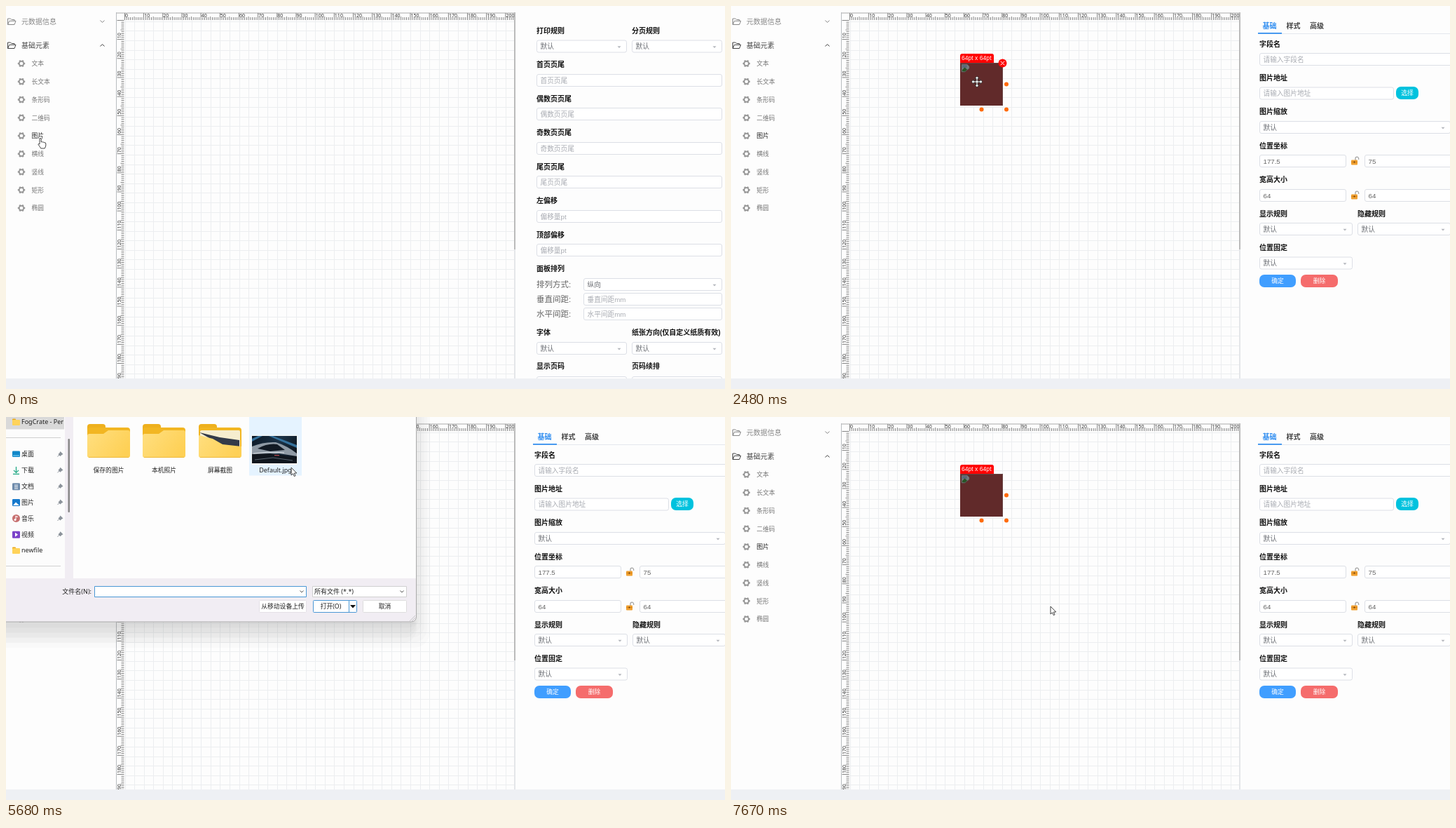
Animation of 1026x546 px, one loop 8000 ms. Source, as an HTML page with a canvas:

```html
<!DOCTYPE html>
<html lang="zh">
<head>
<meta charset="utf-8">
<style>
html, body { margin: 0; width: 100%; height: 100%; overflow: hidden; background: #fdfdfd; }
canvas { display: block; }
</style>
</head>
<body>
<canvas id="stage" width="1026" height="546"></canvas>
<script>
const ctx = document.getElementById('stage').getContext('2d');
const LOOP = 8000;
const UI = '"Liberation Sans", "Noto Sans CJK SC", "Noto Sans CJK", sans-serif';
const SYSTEM = '"Noto Sans", "Noto Sans CJK SC", "Noto Sans CJK", sans-serif';

// time, x, y, shape of the pointer; it jumps from one place to the next
const POINTER = [
  [0, 49, 188, 'hand'], [220, 52, 188, 'hand'], [500, 190, 150, 'move'], [780, 325, 112, 'move'],
  [1080, 394.5, 95.5, 'move'], [1640, 386, 98, 'move'], [1920, 366, 104, 'move'], [2200, 351, 108, 'move'],
  [3320, 420, 112, 'arrow'], [3600, 640, 120, 'arrow'], [3880, 860, 125, 'arrow'], [4160, 964, 125, 'hand'],
  [4740, 964, 125, 'arrow'], [5100, 890, 118, 'arrow'], [5400, 610, 95, 'arrow'], [5680, 407, 72, 'arrow'],
  [6240, 416, 130, 'arrow'], [6520, 438, 222, 'arrow'], [6800, 451, 264, 'arrow'], [7100, 455, 269, 'arrow'],
  [7380, 456, 270, 'arrow']
];
const DRAG = 500, DROP = 1360, SELECT = 2480, LEAVE = 3320, OPEN = 5100, HOVER = 5680, PICK = 5960, CLOSE = 7380;

function rect(x, y, w, h, color) {
  ctx.fillStyle = color;
  ctx.fillRect(x, y, w, h);
}

function box(x, y, w, h, radius, fill, stroke, width = 1) {
  ctx.beginPath();
  ctx.roundRect(x, y, w, h, radius);
  if (fill) { ctx.fillStyle = fill; ctx.fill(); }
  if (stroke) { ctx.strokeStyle = stroke; ctx.lineWidth = width; ctx.stroke(); }
}

function dot(x, y, r, fill) {
  ctx.beginPath();
  ctx.arc(x, y, r, 0, 7);
  ctx.fillStyle = fill;
  ctx.fill();
}

function line(points, color, width = 1) {
  ctx.beginPath();
  for (let i = 0; i < points.length; i += 2) ctx.lineTo(points[i], points[i + 1]);
  ctx.strokeStyle = color;
  ctx.lineWidth = width;
  ctx.stroke();
}

function shape(path, x, y, fill, stroke, width = 1) {
  ctx.save();
  ctx.translate(x, y);
  const p = new Path2D(path);
  if (fill) { ctx.fillStyle = fill; ctx.fill(p); }
  if (stroke) { ctx.strokeStyle = stroke; ctx.lineWidth = width; ctx.stroke(p); }
  ctx.restore();
}

function gradient(x0, y0, x1, y1, ...colors) {
  const g = ctx.createLinearGradient(x0, y0, x1, y1);
  colors.forEach((c, i) => g.addColorStop(i / (colors.length - 1), c));
  return g;
}

// y is the middle of the glyphs
function text(str, x, y, size, color, { weight = 400, align = 'left', font = UI } = {}) {
  ctx.font = `${weight} ${size}px ${font}`;
  ctx.textAlign = align;
  ctx.fillStyle = color;
  ctx.fillText(str, x, y + size * 0.37);
}

const label = (str, x, y) => text(str, x, y, 10, '#111', { weight: 700 });

function field(x, y, w, str, color = '#a8abb2') {
  box(x + .5, y - 8.5, w - 1, 17, 2.5, '#fff', '#dcdfe6');
  text(str, x + 5.5, y, 9.7, color);
}

function select(x, y, w, str = '默认') {
  field(x, y, w, str, '#6b6e74');
  shape('M-2.5 -1H2.5L0 1.7Z', x + w - 11, y + .7, '#b4b7bd');
}

function button(x, y, w, str, color) {
  box(x, y - 9, w, 18, 7, color);
  text(str, x + w / 2, y, 8.8, '#fff', { align: 'center' });
}

function sidebar() {
  const group = (str, y, color, flip) => {
    shape('M0 4.5V-4H4L5.5 -2.5H9.5V-.7M0 4.5L2.3 -.7H11.5L9.5 4.5Z', 2.5, y, null, color);
    text(str, 22, y, 10, color);
    line([134.5, y - 1.5 * flip, 137.5, y + 1.5 * flip, 140.5, y - 1.5 * flip], color);
  };
  group('元数据信息', 22, '#888', 1);
  group('基础元素', 56, '#444', -1);
  ['文本', '长文本', '条形码', '二维码', '图片', '横线', '竖线', '矩形', '椭圆'].forEach((name, i) => {
    const y = 82 + 25.75 * i;
    ctx.beginPath();
    ctx.arc(22, y, 3.3, 0, 7);
    ctx.strokeStyle = '#999';
    ctx.lineWidth = 1.9;
    ctx.stroke();
    for (let a = 0; a < 6; a++) {
      const c = Math.cos(a * Math.PI / 3), s = Math.sin(a * Math.PI / 3);
      line([22 + 3.5 * c, y + 3.5 * s, 22 + 5.2 * c, y + 5.2 * s], '#999', 2.4);
    }
    text(name, 36.5, y, 8.8, i === 4 ? '#222' : '#777');
  });
}

function paper() {
  const mm = 2.717;
  ctx.save();
  ctx.beginPath();
  ctx.rect(157, 9, 569, 522);
  ctx.clip();
  rect(157, 9, 569, 522, '#fdfdfd');
  for (let i = 0; i < 41; i++) {
    rect(Math.round(169.5 + i * 5 * mm), 20, 1, 511, '#eceef0');
    rect(169, Math.round(21.8 + i * 5 * mm), 557, 1, '#eceef0');
  }
  rect(157, 9.5, 569, 1, '#aaa');
  rect(157, 9, 1, 522, '#b8bcc0');
  for (let i = 0; i <= 205; i++) {
    const long = i % 10 === 0, size = long ? 10 : i % 5 ? 4 : 5;
    const x = 169 + i * mm, y = 20 + i * mm;
    rect(x, 20 - size, .9, size, '#777');
    rect(168.5 - size, y, size, .9, '#777');
    if (!long) continue;
    text(String(i), x + 1, 13, 7, '#333', { font: SYSTEM });
    if (!i) continue;
    ctx.save();
    ctx.translate(161, y - 1);
    ctx.rotate(-Math.PI / 2);
    text(String(i), 0, 0, 7, '#333', { font: SYSTEM });
    ctx.restore();
  }
  ctx.restore();
  rect(725, 9, 2, 522, '#e4e6e9');
  rect(725, 9, 2, 338, '#bbb');
}

function pagePanel() {
  label('打印规则', 757, 35);
  select(757, 57.5, 129);
  label('分页规则', 893, 35);
  select(893, 57.5, 129);
  ['首页页尾', '偶数页页尾', '奇数页页尾', '尾页页尾', '左偏移', '顶部偏移'].forEach((name, i) => {
    const y = 83.5 + 48.5 * i;
    label(name, 757, y);
    field(757, Math.round(y + 22), 265, i < 4 ? name : '偏移量pt');
  });
  label('面板排列', 757, 374);
  ['排列方式:', '垂直间距:', '水平间距:'].forEach((name, i) => text(name, 757, 396.5 + 21.3 * i, 11.5, '#666'));
  select(824, 397, 198, '纵向');
  field(824, 418, 198, '垂直间距mm');
  field(824, 439, 198, '水平间距mm');
  label('字体', 757, 465);
  select(757, 488, 129);
  label('纸张方向(仅自定义纸质有效)', 893, 465);
  select(893, 488, 129);
  label('显示页码', 757, 513.5);
  label('页码续排', 893, 513.5);
  select(757, 537, 129, '');
  select(893, 537, 129, '');
}

function padlock(y) {
  shape('M1 -1V-3.5A2.3 2.3 0 0 1 5.6 -3.5V-2', 890, y, null, '#a5a5a5', 1.3);
  box(885, y - 1.5, 9, 7, 1, '#f0a030');
  rect(885, y + 1, 9, 1, '#d98318');
  dot(889.5, y + 1.5, 1.1, '#663808');
}

function elementPanel() {
  rect(752, 39, 274, 1, '#e4e7ed');
  rect(752, 38, 34, 1.7, '#2d8cf0');
  text('基础', 758.5, 28, 10, '#2d8cf0', { weight: 700 });
  text('样式', 792.5, 28, 10, '#444', { weight: 700 });
  text('高级', 826, 28, 10, '#444', { weight: 700 });
  label('字段名', 754, 54);
  field(754, 76, 280, '请输入字段名');
  label('图片地址', 754, 102);
  field(754, 124.5, 192, '请输入图片地址');
  button(949, 124, 32, '选择', '#00c2de');
  label('图片缩放', 754, 150.5);
  select(754, 173, 273);
  [['位置坐标', 199, '177.5', '75'], ['宽高大小', 247.5, '64', '64']].forEach(([name, y, a, b]) => {
    const row = Math.round(y + 22);
    label(name, 754, y);
    field(754, row, 124, a, '#666');
    padlock(row);
    field(904, row, 130, b, '#666');
  });
  label('显示规则', 754, 296);
  select(754, 318, 133);
  label('隐藏规则', 894, 296);
  select(894, 318, 133);
  label('位置固定', 754, 344.5);
  select(754, 366.5, 133);
  button(754, 392, 52, '确定', '#409eff');
  button(813, 392, 53, '删除', '#f56c6c');
}

function brokenImage(x, y) {
  shape('M0 0H8L11 3V6L7 9L5 11H0Z', x, y, '#f3f6fa', '#aaa', .7);
  rect(x + 1.2, y + 1.2, 6.5, 4, '#b6cff2');
  shape('M1 10V8L4.5 4.5L8 7.5L5 10.5Z', x, y, '#4fa94a');
}

function pictureElement(t, px, py) {
  const held = t < DROP;
  const x = held ? px - 66.5 : 327, y = held ? py - 12.5 : 81;
  rect(x, y, 61, 61, '#c45454');
  line([x, y + .5, x + 60.5, y + .5, x + 60.5, y + 60.5], '#d4a0a0', .7);
  brokenImage(x + 2, y + 2);
  if (t < SELECT) return;
  rect(x, y, 61, 61, 'rgba(0,0,0,.5)');
  box(327, 68, 48, 13, [3, 3, 0, 0], '#f00');
  text('64pt x 64pt', 329, 73.5, 8.6, '#fff');
  [[393, 111.5], [357.5, 147.5], [393, 147.5]].forEach(([hx, hy]) => dot(hx, hy, 3, '#ff6a0c'));
  if (t >= LEAVE) return;
  dot(387.5, 81.5, 6, '#f00');
  line([384.7, 78.7, 390.3, 84.3], '#fff');
  line([390.3, 78.7, 384.7, 84.3], '#fff');
}

function folder(x, name, preview) {
  box(x, 10, 26, 20, 4, '#eeb01e');
  box(x, 15, 61, 42, 4, '#f2b622');
  if (preview) {
    box(x + 2, 19, 57, 26, 2, '#f6edcf');
    shape('M1 13L30 20L58 24V35L36 34L22 25Z', x, 9, '#343b49');
  }
  const front = preview
    ? 'M0 16L20 21L34 29L61 32V45Q61 48 58 48H3Q0 48 0 45Z'
    : 'M0 17Q0 14 3 14H23L30 9H58Q61 9 61 12V45Q61 48 58 48H3Q0 48 0 45Z';
  shape(front, x, 10, gradient(0, 10, 50, 48, '#ffdf80', '#fed055'));
  rect(x + 2, 57, 57, 1, '#eeb93a');
  text(name, x + 30.5, 75.5, 8.8, '#222', { align: 'center', font: SYSTEM });
}

function thumbnail(x, y) {
  rect(x - 1, y - 1, 66, 42, '#f4f4f4');
  rect(x, y, 64, 39, gradient(x, y, x + 64, y + 39, '#0d1825', '#1b3247', '#080c12'));
  shape('M30 0L64 13V17L24 0ZM0 8L15 0H9L0 4Z', x, y, '#35719c');
  shape('M0 15Q17 8 34 9Q50 14 64 25V29L39 25L14 27L0 26Z', x, y, '#8f9aa5');
  shape('M8 18Q23 10 36 12L47 20L26 22Z', x, y, '#121a24');
  shape('M0 26L26 25L42 27L64 33V39H0Z', x, y, '#10161e');
  line([x + 2, y + 25, x + 25, y + 23, x + 46, y + 24], '#dfe5ea', 1.2);
  line([x + 4, y + 34, x + 30, y + 31, x + 58, y + 35], '#59646f', 1);
  rect(x + 32, y + 27, 7, 1.3, '#b0474c');
}

function navIcon(kind, y) {
  if (kind === 1) {
    line([14.5, y - 5, 14.5, y + 3], '#20a884', 1.3);
    line([11, y, 14.5, y + 3.5, 18, y], '#20a884', 1.3);
    line([10, y + 5.5, 19, y + 5.5], '#20a884', 1.3);
  } else if (kind === 4) {
    dot(14.5, y, 5.5, '#c77070');
    line([14, y + 2, 14, y - 3, 17, y - 2], '#fff', 1.1);
    dot(13, y + 2, 1.5, '#fff');
  } else if (kind === 6) {
    box(9, y - 4.5, 5, 4, 1, '#e9a818');
    box(9, y - 3, 11, 8, 1, '#ffd35a');
  } else {
    box(9, y - 4.5, 11, kind === 0 ? 8.5 : 10, 1.3, ['#1287c8', 0, '#6e8bab', '#1679cc', 0, '#7b42c9'][kind]);
    if (kind === 0) rect(10, y + 1.5, 9, 1, '#8fe0ff');
    if (kind === 2) for (let i = 0; i < 3; i++) rect(12, y - 2 + i * 2.4, 5, 1, '#fff');
    if (kind === 3) shape('M10 4.5L14 0L19 4.5Z', 0, y, '#fff');
    if (kind === 5) shape('M13 -2.5L17 .5L13 3.5Z', 0, y, '#fff');
  }
}

function dialogShadow() {
  for (let i = 1; i <= 5; i++) box(-30, -30, 615 + 4 * i, 322 + 7.4 * i, 8 + 3 * i, 'rgba(50,45,55,.02)');
  // denser below the window than beside it
  for (let i = 1; i <= 4; i++) box(-30, -30, 612 + i, 324 + 7 * i, 8 + 3 * i, 'rgba(50,45,55,.02)');
}

function dialog(t) {
  const opt = { font: SYSTEM };
  const picked = t >= PICK;
  dialogShadow();
  box(-10, -10, 595.5, 302, 7, '#f1edf3', '#aaa');
  rect(0, 0, 84, 230, '#fcfcfc');
  rect(96, 0, 489, 230, '#fdfdfd');
  rect(0, 0, 83, 17.5, '#d9d9d9');
  navIcon(6, 7);
  ctx.save();
  ctx.beginPath();
  ctx.rect(0, 0, 83, 18);
  ctx.clip();
  text('FogCrate - Per', 22, 7, 9, '#222', opt);
  ctx.restore();
  rect(0, 29, 78, 1, '#d0d0d0');
  rect(0, 212, 78, 1, '#d0d0d0');
  box(88.5, 31, 2.5, 105, 1.2, '#888');
  ['桌面', '下载', '文档', '图片', '音乐', '视频', 'newfile'].forEach((name, i) => {
    const y = 53 + 22.85 * i;
    navIcon(i, y);
    text(name, 22, y, 9, '#222', opt);
    if (i < 6) {
      shape('M0 -4L4 0L2 1L0 3L-3 0L-1 -2Z', 77.5, y, '#8b929a');
      line([76, y + 1, 73.5, y + 3.5], '#8b929a');
    }
  });
  folder(116, '保存的图片');
  folder(195, '本机照片');
  folder(275, '屏幕截图', true);
  if (picked) box(346.5, -5, 75, 88, 0, '#cce8ff', '#3d5366');
  else if (t >= HOVER) rect(347, 0, 75, 83.5, '#e5f3ff');
  thumbnail(351, 27);
  text('Default.jpg', 384.5, 75.5, 9, '#222', { align: 'center', font: SYSTEM });

  text('文件名(N):', 122, 249, 9, '#222', { align: 'right', font: SYSTEM });
  box(126.5, 241.5, 302, 15, 0, '#fff', picked ? '#aaa' : '#4b98d5');
  if (picked) text('Default.jpg', 128, 249, 9, '#222', opt);
  box(437.5, 241.5, 134, 15, 0, '#fff', '#d0d0d0');
  text('所有文件 (*.*)', 440, 249, 9, '#222', opt);
  [422, 565].forEach(x => line([x - 2.5, 247.5, x, 250, x + 2.5, 247.5], '#555'));
  const push = (x, w, str, center, stroke) => {
    box(x + .5, 261.5, w - 1, 17, 1, '#fff', stroke);
    text(str, center, 270, 8.8, '#222', { align: 'center', font: SYSTEM });
  };
  push(361, 68, '从移动设备上传', 395, '#e4e0e6');
  push(438, 63, '打开(O)', 463.5, '#4b98d5');
  push(509, 63, '取消', 540.5, '#ddd');
  rect(489, 262, 1, 16, '#4b98d5');
  shape('M-4 -2H4L0 2.5Z', 495, 270, '#111');
  for (let i = 0; i < 3; i++) line([576 + 3 * i, 291, 584, 283 + 3 * i], '#bbb', .8);
}

function pointer(x, y, kind) {
  ctx.lineJoin = 'round';
  if (kind === 'arrow') {
    shape('M0 0V11L2.6 8.7L4.3 12.6L6 11.8L4.4 8H7.8Z', x, y, '#fff', '#333', .9);
  } else if (kind === 'hand') {
    shape('M-1 1Q0 -1 1.2 1V6Q2.5 5 3.6 6.2Q5 5.6 5.8 6.8Q7.6 6.3 7.8 8V11Q7.5 13 6.2 15H.8Q-1 12 -3 9.5Q-3 7.5 -1 9Z', x, y, '#fff', '#333', .9);
  } else {
    const arms = 'M0 -8L3 -4.5H1V-1H4.5V-3L8 0L4.5 3V1H1V4.5H3L0 8L-3 4.5H-1V1H-4.5V3L-8 0L-4.5 -3V-1H-1V-4.5H-3Z';
    shape(arms, x, y, '#fff', '#333', .9);
  }
  ctx.lineJoin = 'miter';
}

function draw(t) {
  const [, px, py, kind] = POINTER.findLast(p => p[0] <= t);
  rect(0, 0, 1026, 546, '#fdfdfd');
  sidebar();
  paper();
  if (t < SELECT) pagePanel();
  else elementPanel();
  rect(0, 531, 1026, 15, '#eef0f4');
  if (t >= DRAG) pictureElement(t, px, py);
  if (t >= OPEN && t < CLOSE) dialog(t);
  pointer(px, py, kind);
}

const start = performance.now();
function tick() {
  draw((performance.now() - start) % LOOP);
  requestAnimationFrame(tick);
}
tick();
</script>
</body>
</html>
```
